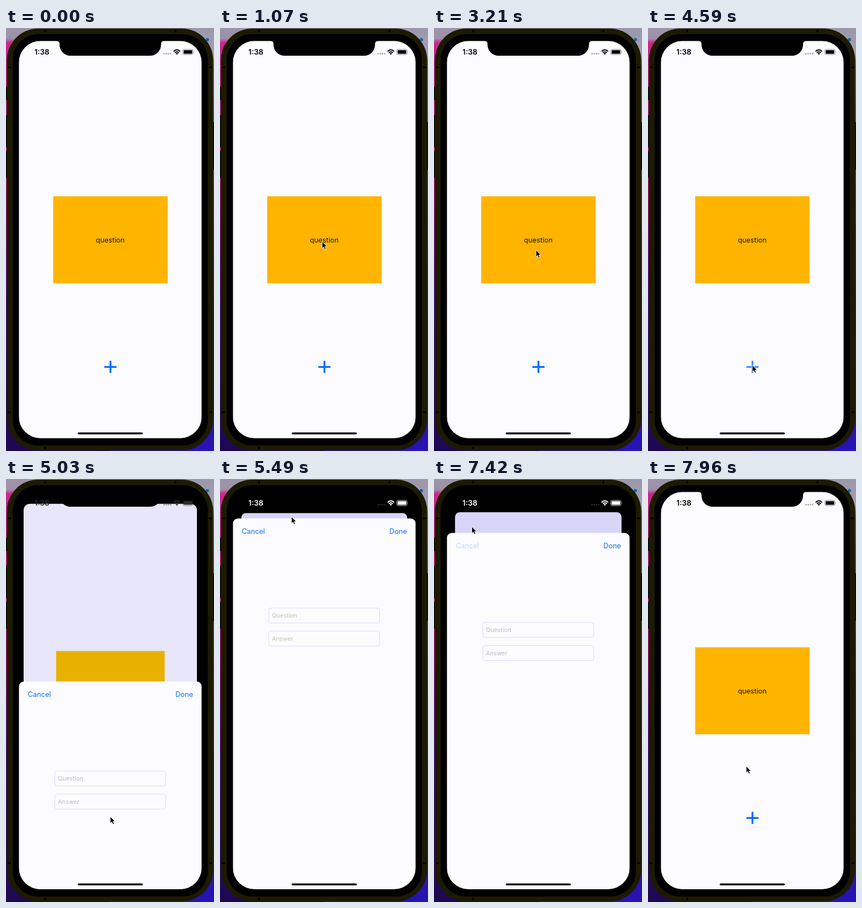
An HTML page for the animation above (8000 ms loop, 377x763 px).

```html
<!DOCTYPE html>
<html lang="en">
<head>
<meta charset="utf-8">
<title>Flashcard app</title>
<style>
  html, body { margin: 0; width: 100%; height: 100%; overflow: hidden; background: #000; }
  svg { display: block; width: 100%; height: 100%; }
  text { font-family: Inter, Roboto, sans-serif; font-size: 12.8px; }
  .clock { font-size: 13.4px; font-weight: 600; }
  .link { fill: #0a70ff; }
  .field { fill: #fcfcff; stroke: #dcd8f4; }
  .hint { font-size: 10.9px; fill: #bebdc0; }
</style>
</head>
<body>
<svg viewBox="0 0 377 763" preserveAspectRatio="none">
  <defs>
    <linearGradient id="leftWall" x2="0" y2="1">
      <stop offset="0" stop-color="#9a96aa"/>
      <stop offset=".025" stop-color="#a08fa8"/>
      <stop offset=".035" stop-color="#c8288c"/>
      <stop offset=".4" stop-color="#a0126e"/>
      <stop offset=".65" stop-color="#4a1080"/>
      <stop offset="1" stop-color="#1c0850"/>
    </linearGradient>
    <linearGradient id="rightWall" x2="0" y2="1">
      <stop offset="0" stop-color="#9a98aa"/>
      <stop offset=".06" stop-color="#a79db4"/>
      <stop offset=".09" stop-color="#b04a90"/>
      <stop offset=".4" stop-color="#702078"/>
      <stop offset=".7" stop-color="#301080"/>
      <stop offset="1" stop-color="#2814b4"/>
    </linearGradient>
    <clipPath id="screenClip"><rect x="23.3" y="23.3" width="331.4" height="716.7" rx="39"/></clipPath>
  </defs>

  <rect width="189" height="763" fill="url(#leftWall)"/>
  <rect x="189" width="188" height="763" fill="url(#rightWall)"/>
  <circle cx="365" cy="21" r="3" fill="#1668a8"/>
  <path d="M0 106h3v24H0zM0 157h3v58H0zM0 222h3v48H0zM374 170h3v86h-3z" fill="#0c0a10"/>
  <rect x="1.5" y="1" width="374" height="761" rx="57" fill="#1c1a02"/>
  <rect x="12" y="11" width="354" height="742" rx="46"/>
  <path d="M3 71h6M368 71h6M3 693h6M368 693h6M71 3v5M307 3v5M71 755v5" stroke="#000" stroke-width="3"/>

  <g clip-path="url(#screenClip)">
    <g id="home">
      <rect id="page" x="23.3" y="23.3" width="331.4" height="740"/>
      <rect id="card" x="85.5" y="303.5" width="207.5" height="157"/>
      <text id="label" x="189" y="386.5" text-anchor="middle"></text>
      <path id="plus" d="M178.3 611.3h22M189.3 600.3v22" stroke="#006cff" stroke-width="3.3"/>
    </g>
    <g id="sheet">
      <rect x="23.3" width="331.4" height="760" rx="9" fill="#fcfcff"/>
      <text id="cancel" class="link" x="39.5" y="27.3">Cancel</text>
      <text class="link" x="339" y="27.3" text-anchor="end">Done</text>
      <rect class="field" x="88.5" y="161.5" width="201" height="27" rx="4"/>
      <rect class="field" x="88.5" y="203" width="201" height="27" rx="4"/>
      <text class="hint" x="94" y="178.6">Question</text>
      <text class="hint" x="94" y="220.3">Answer</text>
    </g>
  </g>
  <path d="M91 23.3Q97 23.3 97 29V30A20 20 0 0 0 117 50H261A20 20 0 0 0 281 30V29Q281 23.3 287 23.3V21H91Z"/>

  <g id="status">
    <text class="clock" x="51.5" y="48">1:38</text>
    <g id="dots"><circle cx="286.5" cy="46.3" r="1.5"/><circle cx="290.4" cy="46.3" r="1.5"/><circle cx="294.3" cy="46.3" r="1.5"/><circle cx="298.2" cy="46.3" r="1.5"/></g>
    <path d="M303.8 42.2Q309.7 36.4 315.6 42.2M306 44.7Q309.7 41.2 313.4 44.7" fill="none" stroke="currentColor" stroke-width="1.9"/>
    <path d="M307.5 45.9Q309.7 44.2 311.9 45.9L309.7 48.2Z"/>
    <rect id="shell" x="320.5" y="38.5" width="18.5" height="9.5" rx="2.6" fill="none" stroke="currentColor"/>
    <rect x="322" y="40" width="15.5" height="6.5" rx="1.3"/>
    <path d="M340 41.7q1.5 1.5 0 3z" opacity=".5"/>
  </g>
  <rect x="130" y="729.5" width="118" height="3.6" rx="1.8"/>
  <path id="cursor" d="M0 0V12.2L2.8 9.6L4.7 14L6.9 13L5 8.8H8.8Z" stroke="#fff" stroke-width=".9"/>
</svg>
<script>
const LOOP = 8000, SPRING_RATE = 18.26;
const FLIP_TO_ANSWER = 1290, FLIP_BACK = 2960, PRESENT = 4928, DISMISS = 7404;

// [time, x, y] of the pointer tip
const pointerPath = [
  [20, 226, 505], [330, 190, 400], [500, 188, 392], [1270, 184.5, 384], [3050, 184.5, 384],
  [3790, 188, 520], [4400, 189, 608], [5060, 189, 609], [5480, 129.5, 68],
  [6340, 72, 86], [7180, 68.5, 86], [7440, 68.5, 86], [7960, 178, 518],
];

const el = Object.fromEntries([...document.querySelectorAll('svg [id]')].map(e => [e.id, e]));
const set = (node, attrs) => { for (const k in attrs) node.setAttribute(k, attrs[k]); };
const clamp = v => Math.min(1, Math.max(0, v));
const lerp = (a, b, k) => a + (b - a) * k;
const mix = (a, b, k) => `rgb(${a.map((v, i) => Math.round(lerp(v, b[i], k)))})`;
const ramp = (t, from, to) => clamp((t - from) / (to - from));

// Critically damped spring from 0 to 1
function spring(ms) {
  const x = SPRING_RATE * Math.max(0, ms) / 1000;
  return 1 - (1 + x) * Math.exp(-x);
}

// Button fade: dims on press, recovers on release
const pressed = (t, down, up) => 1 - 0.75 * (ramp(t, down, down + 90) - ramp(t, up, up + 250));

function pointerAt(t) {
  const i = pointerPath.findIndex(k => k[0] > t);
  if (i < 0) return pointerPath[pointerPath.length - 1].slice(1);
  const [t0, x0, y0] = pointerPath[i - 1], [t1, x1, y1] = pointerPath[i];
  let k = ramp(t, t0, t1);
  k = k * k * (3 - 2 * k);
  return [lerp(x0, x1, k), lerp(y0, y1, k)];
}

function draw(t) {
  const answer = t >= FLIP_TO_ANSWER && t < FLIP_BACK;
  const p = t < DISMISS ? spring(t - PRESENT) : 1 - spring(t - DISMISS);

  set(el.home, { transform: `translate(189 ${lerp(23.3, 61.5, p)}) scale(${lerp(1, 0.907, p)}) translate(-189 -23.3)` });
  set(el.page, { fill: mix([252, 252, 255], [214, 212, 246], p), rx: lerp(16, 9, p) });
  set(el.card, { fill: answer ? '#006cff' : mix([255, 180, 0], [214, 175, 0], p) });
  set(el.label, { fill: answer ? '#fff' : '#1c1400' });
  el.label.textContent = answer ? 'answer' : 'question';
  set(el.plus, { opacity: pressed(t, 4560, 4760) });

  set(el.sheet, { transform: `translate(0 ${lerp(741, 71, p)})` });
  set(el.cancel, { opacity: pressed(t, 7240, 7430) });

  const light = ramp(p, 0.5, 0.85);
  const ink = mix([0, 0, 0], [255, 255, 255], light);
  set(el.status, { fill: ink, color: ink });
  set(el.shell, { 'stroke-opacity': lerp(0.45, 0.8, light) });
  set(el.dots, { fill: mix([176, 176, 184], [42, 42, 36], light) });

  const visible = t >= 20;
  set(el.cursor, { visibility: visible ? 'visible' : 'hidden' });
  if (visible) set(el.cursor, { transform: `translate(${pointerAt(t)})` });
}

const start = performance.now();
function tick() {
  draw((performance.now() - start) % LOOP);
  requestAnimationFrame(tick);
}
tick();
</script>
</body>
</html>
```
